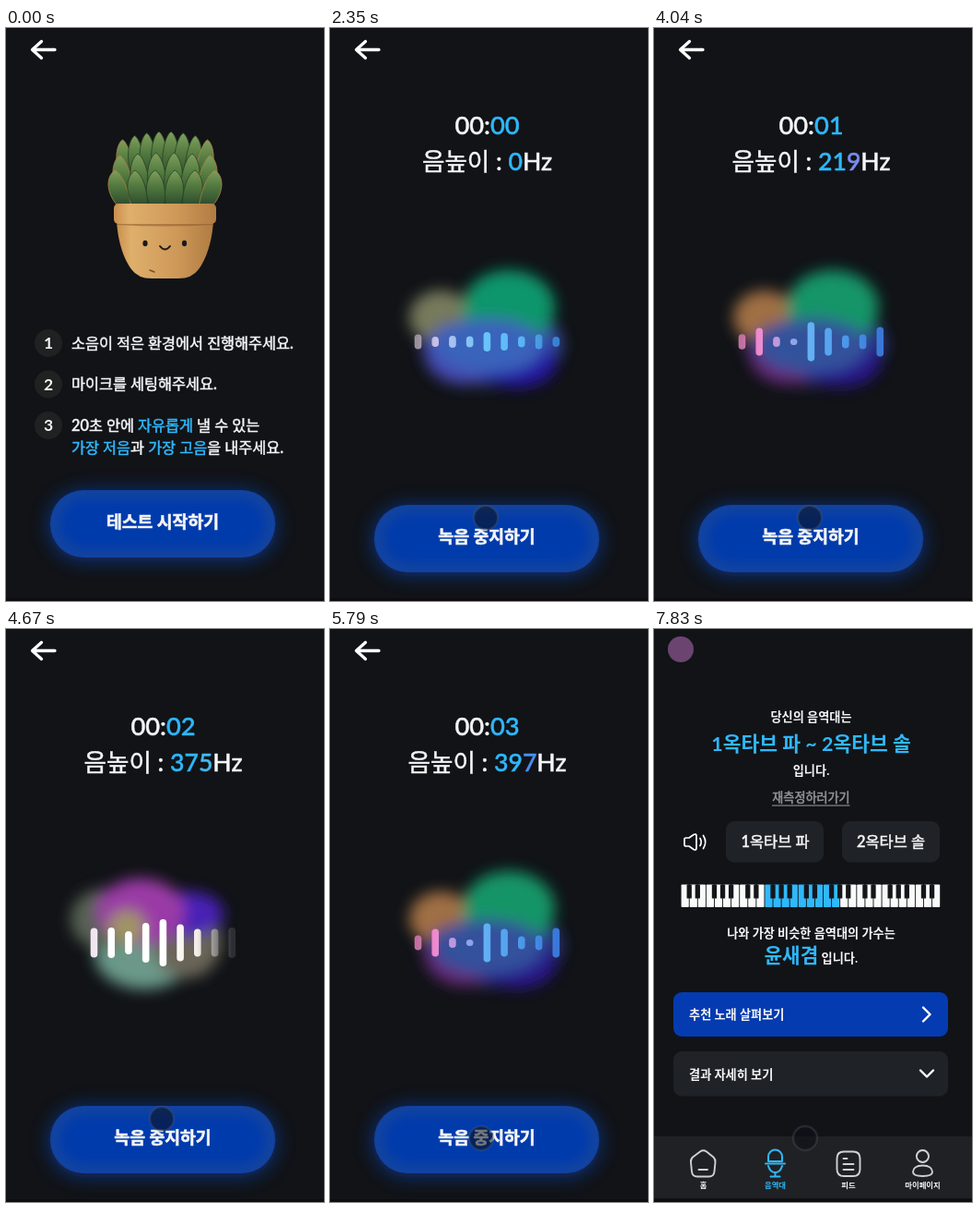
These frames come from a looping animation (345x620 px, 8 s). An HTML page:

```html
<!DOCTYPE html>
<html lang="ko">
<head>
<meta charset="utf-8">
<style>
html, body { margin: 0; width: 100%; height: 100%; overflow: hidden; background: #111317; }
svg { display: block; width: 345px; height: 620px; }
text { font-family: Lato, "Noto Sans CJK KR", "Noto Sans CJK", sans-serif; fill: #f4f5f6; }
.b { font-weight: 700; }
.m { font-weight: 500; stroke: #f4f5f6; stroke-width: .5px; }
.x { font-weight: 700; stroke: #f4f5f6; stroke-width: .6px; }
.c { text-anchor: middle; }
.sky { fill: #2fb8fb; }
.m .sky { stroke: #2fb8fb; }
.line { fill: none; stroke: #fff; stroke-linecap: round; stroke-linejoin: round; }
</style>
</head>
<body>
<svg viewBox="0 0 345 620">
  <defs>
    <filter id="glow" x="-20%" y="-60%" width="140%" height="220%"><feGaussianBlur stdDeviation="10"/></filter>
    <filter id="inset" x="-10%" y="-30%" width="120%" height="160%"><feGaussianBlur stdDeviation="6"/></filter>
    <filter id="soft" filterUnits="userSpaceOnUse" x="30" y="220" width="270" height="220"><feGaussianBlur stdDeviation="8"/></filter>
    <linearGradient id="clay"><stop offset="0" stop-color="#c98f4c"/><stop offset=".15" stop-color="#dfaf6c"/><stop offset=".6" stop-color="#cf9a59"/><stop offset="1" stop-color="#b07c42"/></linearGradient>
    <linearGradient id="leaf" x1="0" y1="0" x2="0" y2="1"><stop offset="0" stop-color="#7f9f5c"/><stop offset=".4" stop-color="#52793f"/><stop offset="1" stop-color="#26422a"/></linearGradient>
    <linearGradient id="barFill" gradientUnits="userSpaceOnUse" x1="95" y1="0" x2="245" y2="0"></linearGradient>
  </defs>
  <rect width="345" height="620" fill="#111317"/>
  <g id="start"></g>
  <g id="record"></g>
  <path id="back" class="line" stroke-width="3.3" d="M53 23.5H29M38.500 14.500L28.500 23.500L38.500 32.500"/>
  <g id="result"></g>
  <rect y="617" width="345" height="3" fill="#0e0c11"/>
  <g id="cursor"><circle id="dot" r="13"/></g>
</svg>
<script>
const $ = id => document.getElementById(id);
const LOOP = 8000, STEP = 70, REC_START = 2350;

const txt = (x, y, size, cls, s) => `<text x="${x}" y="${y}" font-size="${size}" class="${cls}">${s}</text>`;
const box = (x, y, w, h, r, fill) => `<rect x="${x}" y="${y}" width="${w}" height="${h}" rx="${r}" fill="${fill}"/>`;
const line = (d, w, color = '#fff') => `<path class="line" style="stroke:${color}" stroke-width="${w}" d="${d}"/>`;
const sky = s => `<tspan class="sky">${s}</tspan>`;

function pill(y, label) {
  return `<g filter="url(#glow)" opacity=".55">${box(46, y, 248, 77, 38, '#1048c4')}</g>` +
    box(48, y, 244, 73, 36, '#12439f') +
    `<g filter="url(#inset)">${box(59, y + 10, 222, 53, 26, '#043aac')}</g>` +
    txt(170, y + 41, 18.3, 'x c', label);
}

function plant() {
  const rows = [[8, 46, 112, 9, 11], [6, 49, 135, 3, 12.5], [6, 54, 154, 0, 12.5]];
  let s = '<path fill="#26402a" d="M124 135H220L222 195H123Z"/>';
  rows.forEach(([n, span, top, drop, w]) => {
    for (let i = 0; i < n; i++) {
      const u = i / (n - 1) * 2 - 1;
      const x = 172.5 + u * span, y = top + drop * u * u;
      const bx = 172.5 + u * span * .78, by = Math.min(y + 54, 196), my = (y + by) / 2;
      const edge = Math.abs(u) === 1 ? '#a87f45' : '#2a4628';
      s += `<path fill="url(#leaf)" stroke="${edge}" stroke-width=".9" d="M${x} ${y}C${x + w * .6} ${y + 4} ${x + w * 1.15} ${my} ${bx + w * .5} ${by}H${bx - w * .5}C${x - w * 1.15} ${my} ${x - w * .6} ${y + 4} ${x} ${y}Z"/>`;
    }
  });
  return s +
    '<path fill="url(#clay)" d="M120 208H225C224 229 218 249 209 261Q202 271 187 271H158Q143 271 136 261C127 249 121 229 120 208Z"/>' +
    '<path fill="#8d5a2c" opacity=".55" d="M120 210H225V213Q172 216 120 213Z"/>' +
    '<rect x="117" y="190" width="111" height="22" rx="5" fill="url(#clay)"/>' +
    '<ellipse cx="151" cy="233" rx="2.6" ry="3.2" fill="#1b1a18"/><ellipse cx="193.5" cy="233" rx="2.6" ry="3.2" fill="#1b1a18"/>' +
    line('M167 236Q172.5 243 178 236', 2, '#241c16') + line('M156 262L161 264', 1.5, '#7b4d26');
}

function startScreen() {
  const lines = [
    [347, '소음이 적은 환경에서 진행해주세요.'],
    [391, '마이크를 세팅해주세요.'],
    [436, `20초 안에 ${sky('자유롭게')} 낼 수 있는`],
    [460, `${sky('가장 저음')}과 ${sky('가장 고음')}을 내주세요.`]
  ];
  const nums = [341, 385.5, 430].map((y, i) =>
    `<circle cx="46" cy="${y}" r="15" fill="#202222"/>` + txt(46, y + 6.3, 17.5, 'b c', i + 1));
  return plant() + nums.join('') + lines.map(([y, s]) => txt(71, y, 16.3, 'm', s)).join('') + pill(500, '테스트 시작하기');
}

function recordScreen() {
  const bars = [...Array(9)].map((_, i) => `<rect class="bar" x="${91.7 + i * 18.72}" width="7.6" rx="3.8" fill="url(#barFill)"/>`);
  return txt(170.5, 115, 27.3, 'm c', '00:<tspan id="sec" class="sky"></tspan>') +
    txt(170.5, 153.5, 26.6, 'm c', '음높이 : <tspan id="hz" class="sky"></tspan><tspan id="hzEnd"></tspan>Hz') +
    `<g filter="url(#soft)" opacity=".95">${'<ellipse class="blob"/>'.repeat(6)}</g>` +
    bars.join('') + pill(516, '녹음 중지하기');
}

function piano() {
  const w = 9.08;
  let white = '', black = '';
  for (let i = 0; i < 31; i++) {
    const x = 29.6 + i * w, on = i >= 10 && i < 19;
    white += box(x, 276.5, w - .9, 24.5, .8, on ? '#2fb8fb' : '#fafafa');
    if ([0, 1, 3, 4, 5].includes(i % 7) && i < 30) black += box(x + w - 3.1, 276.5, 5.3, 15, .5, '#14161a');
  }
  return white + black;
}

function resultScreen() {
  const gray = '#d0d1d3', blue = '#2fb8fb';
  const tabs = [[53.5, '홈'], [131.5, '음역대'], [211, '피드'], [291.5, '마이페이지']];
  return '<circle cx="29" cy="22" r="14" fill="#6b4470"/>' +
    txt(170.5, 100, 13.2, 'b c', '당신의 음역대는') +
    txt(170.5, 131.5, 21.5, 'b c sky', '1옥타브 파 ~ 2옥타브 솔') +
    txt(170.5, 158, 13.2, 'b c', '입니다.') +
    `<g opacity=".58">${txt(170.5, 187, 13.1, 'm c', '재측정하러가기')}${box(128, 190.5, 84.5, 1, 0, '#fff')}</g>` +
    line('M33 227.5Q33 226 35 226H38L43 222.5Q46 221 46 224V237Q46 240 43 238.5L38 235H35Q33 235 33 233.5ZM50 226.5Q52.5 230.5 50 234.5M53.5 223.5Q58 230.5 53.5 237.5', 1.7) +
    box(78, 208, 106, 44.5, 9, '#1f2227') + box(204, 208, 106, 44.5, 9, '#1f2227') +
    txt(131.5, 236, 16.4, 'm c', '1옥타브 파') + txt(257, 236, 16.4, 'm c', '2옥타브 솔') +
    piano() +
    txt(170.5, 333.5, 13.2, 'b c', '나와 가장 비슷한 음역대의 가수는') +
    txt(119.5, 361, 21.3, 'b sky', '윤새겸') + txt(181.5, 361, 13.2, 'b', '입니다.') +
    box(21, 393, 298, 48, 9, '#043bb0') + txt(38, 422, 13.2, 'b', '추천 노래 살펴보기') + line('M292 409.5L299.5 417L292 424.5', 2.4) +
    box(21, 457, 298, 48.5, 9, '#1f2227') + txt(38, 487, 13.2, 'b', '결과 자세히 보기') + line('M289 477.5L296 484.5L303 477.5', 2.4) +
    box(0, 549, 345, 67, 0, '#202124') +
    line('M50 565.5Q53.5 563 57 565.5L64.5 571.5Q67 574 66.5 577L65.5 587Q65 592.5 59.5 592.5H47Q41.5 592.5 41 587L40 577Q39.5 574 42 571.5ZM48.5 585H58', 1.9, gray) +
    line('M124 576V571A7.5 7.5 0 0 1 139 571V576ZM121 578.5H142M124 581Q126 588 131.5 588Q137 588 139 581M131.5 588V592.5M126.5 592.5H136.5', 2, blue) +
    line('M206 565.5H216Q223.5 565.5 223.5 573V584.5Q223.5 592 216 592H206Q198.5 592 198.5 584.5V573Q198.5 565.5 206 565.5ZM205.5 573H209.5M205.5 579H216.5M205.5 585H216.5', 1.9, gray) +
    line('M291.5 564A6.5 6.5 0 1 1 291.4 564ZM291.5 580.5C299 580.5 302 584 302 587.5C302 591 298 592 291.5 592C285 592 281 591 281 587.5C281 584 284 580.5 291.5 580.5Z', 1.9, gray) +
    tabs.map(([x, s], i) => txt(x, 604.5, 8.4, i === 1 ? 'b c sky' : 'b c', s)).join('');
}

$('start').innerHTML = startScreen();
$('record').innerHTML = recordScreen();
$('result').innerHTML = resultScreen();
$('barFill').innerHTML = [0, .127, .5, .753, 1].map(o => `<stop offset="${o}"/>`).join('');

// Blob poses: ellipses (cx, cy, rx, ry), their colours, bar heights, bar colours.
const hues = s => s.split(' ').map(h => [0, 2, 4].map(i => parseInt(h.slice(i, i + 2), 16)));
const pose = (shapes, fills, heights, barFills) => ({ shapes, fills: hues(fills), heights, barFills: hues(barFills) });
const cool = pose(
  [[176, 342, 76, 44], [120, 313, 34, 29], [146, 352, 44, 34], [202, 362, 44, 27], [194, 302, 50, 40], [172, 344, 60, 30]],
  '3550a8 7d8060 4a48b8 2618a8 0f9d70 3c68c4',
  [16, 11, 13, 12, 21, 19, 12, 16, 11], '9a909c c8c0ea 66c4f8 58b4f4 3a80d0');
const warm = pose(cool.shapes, '2a3a8c a87446 6a2c80 2a1290 129c6c 3455a4',
  [16, 30, 11, 7, 42, 30, 14, 16, 32], 'c070a0 f08ad0 60b0f4 4a98ea 3a78d8');
const violet = pose(
  [[150, 352, 54, 38], [104, 314, 34, 32], [196, 338, 38, 40], [196, 308, 40, 24], [146, 306, 48, 36], [131, 322, 20, 18]],
  '6fa090 5c6656 6f6a5c 4c22c0 a23cae a89c68',
  [32, 33, 25, 43, 51, 40, 30, 30, 33], 'f0e4f0 ffffff ffffff f2ece6 2c2e33');
const pink = pose(
  [[164, 350, 60, 38], [128, 320, 34, 29], [200, 326, 36, 42], [182, 300, 34, 34], [165, 281, 30, 27], [148, 320, 48, 25]],
  '5e4670 cc8c98 483a4c 5a509c 6c7cf4 dca0a4',
  [68, 30, 22, 30, 68, 37, 15, 30, 25], '4a3e48 ffffff fff0fa e4a8b4 35303a');

const CYCLE = 1720;
const clamp = x => Math.max(0, Math.min(1, x));
const ease = x => { x = clamp(x); return x * x * (3 - 2 * x); };
const ramp = (t, a, b) => clamp((t - a) / (b - a));
const mix = (a, b, k) => Array.isArray(a) ? a.map((v, i) => mix(v, b[i], k)) : a + (b - a) * k;
const rgb = c => `rgb(${c.map(Math.round)})`;
const blobs = document.querySelectorAll('.blob');
const bars = document.querySelectorAll('.bar');
const stops = $('barFill').children;

function drawBlob(t) {
  const run = Math.max(0, Math.floor((t - REC_START) / STEP) * STEP);
  const p = run % CYCLE;
  const keys = [[0, run < CYCLE ? cool : warm], [600, violet], [770, violet], [1050, pink], [CYCLE, warm]];
  const i = keys.findIndex(k => p < k[0]);
  const [t0, a] = keys[i - 1], [t1, b] = keys[i];
  const k = ease((p - t0) / (t1 - t0));
  blobs.forEach((el, n) => {
    const s = mix(a.shapes[n], b.shapes[n], k);
    ['cx', 'cy', 'rx', 'ry'].forEach((name, j) => el.setAttribute(name, s[j]));
    el.setAttribute('fill', rgb(mix(a.fills[n], b.fills[n], k)));
  });
  bars.forEach((el, n) => {
    const h = mix(a.heights[n], b.heights[n], k);
    el.setAttribute('y', 339.5 - h / 2);
    el.setAttribute('height', h);
  });
  [...stops].forEach((el, n) => el.setAttribute('stop-color', rgb(mix(a.barFills[n], b.barFills[n], k))));
}

const pitches = [[0, '', '0', '#2fb8fb'], [3260, '21', '9', '#7a8cf0'], [4260, '37', '5', '#45b8f2'], [5260, '39', '7', '#4a90f0']];

function drawCursor(t) {
  const enter = ease(ramp(t, 530, 610)), go = ease(ramp(t, 880, 1560)), shift = ease(ramp(t, 5200, 5620));
  const [x, y] = mix(mix(mix([312, 607], [304, 605], enter), [169, 530], go), [164, 551], shift);
  const press = (t >= 1760 && t < 1890) || (t >= 6450 && t < 6700);
  $('cursor').setAttribute('transform', `translate(${x} ${y})`);
  $('cursor').style.display = t < 530 ? 'none' : '';
  const dot = $('dot').style;
  dot.fill = press ? 'rgba(172,170,38,.8)' : 'rgba(12,14,22,.55)';
  dot.stroke = press ? 'rgba(172,170,38,.8)' : 'rgba(84,92,108,.32)';
  dot.strokeWidth = 2.4;
}

function draw(t) {
  const recording = t >= 1890;
  const out = 1 - ramp(t, 7120, 7330);
  $('start').style.display = recording ? 'none' : '';
  $('record').style.display = recording && out > 0 ? '' : 'none';
  $('record').style.opacity = $('back').style.opacity = out;
  $('result').style.opacity = ramp(t, 7370, 7800);
  if (recording) {
    const sec = Math.max(0, Math.min(4, Math.floor((t - 2080) / 1000)));
    const [, head, tail, tint] = pitches.filter(p => t >= p[0]).pop();
    $('sec').textContent = '0' + sec;
    $('hz').textContent = head;
    $('hzEnd').textContent = tail;
    $('hzEnd').style.fill = $('hzEnd').style.stroke = tint;
    drawBlob(t);
  }
  drawCursor(t);
}

function tick() {
  draw(performance.now() % LOOP);
  requestAnimationFrame(tick);
}
tick();
</script>
</body>
</html>
```
